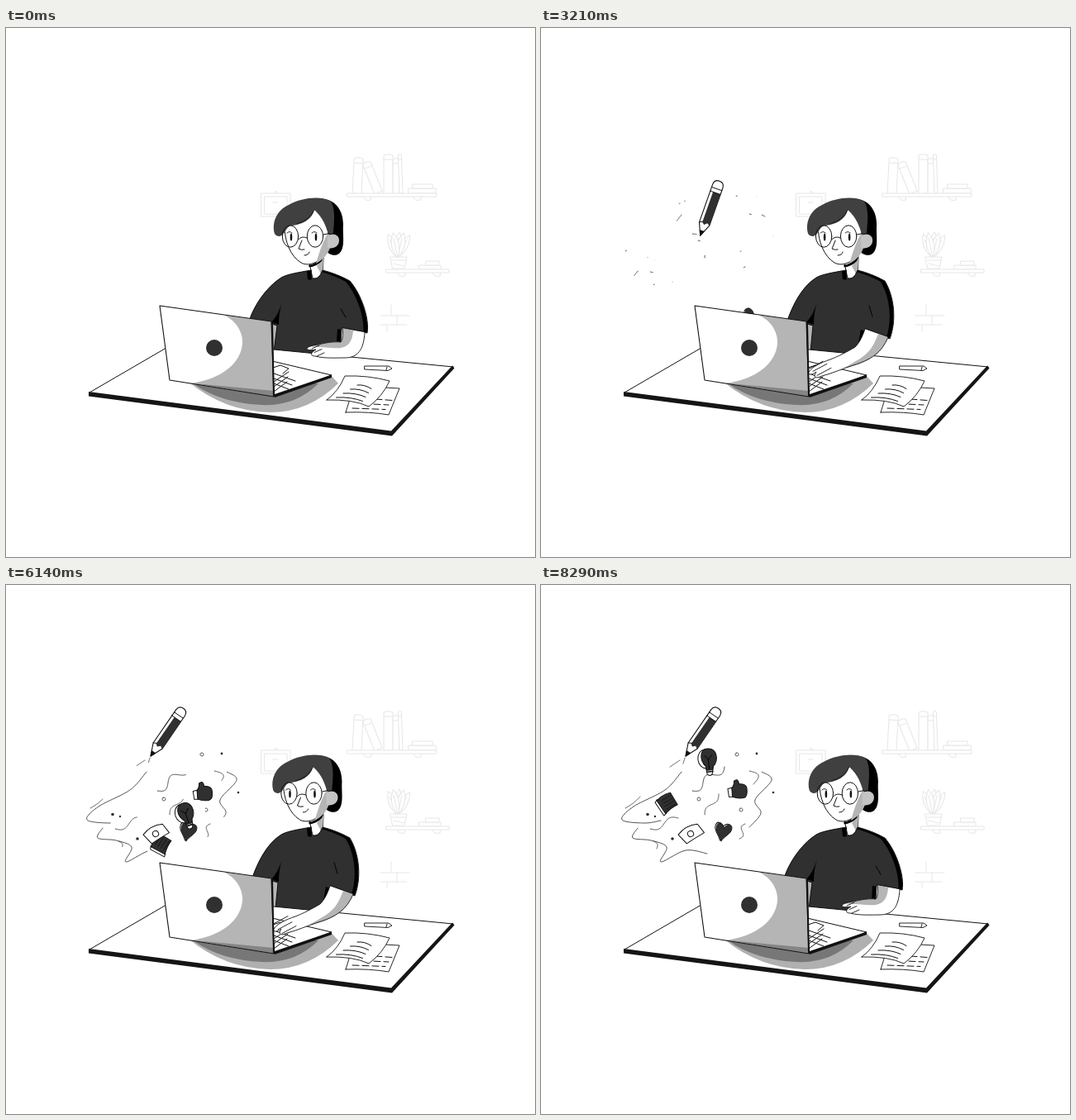
These frames come from a looping animation (640 px wide and 640 px high, 8.43 s). An HTML page with a canvas:

```html
<!DOCTYPE html>
<html lang="en">
<head>
<meta charset="utf-8">
<title>Creative desk</title>
<style>
html, body { margin: 0; width: 100%; height: 100%; overflow: hidden; background: #fff; }
canvas { display: block; width: 640px; height: 640px; }
</style>
</head>
<body>
<canvas id="stage"></canvas>
<script>
const LOOP = 8430, FPS = 14, LAST = 116;
const INK = '#111', DARK = '#303030', HAIR = '#404040', GRAY = '#b5b5b5', WALL = '#e6e6e6';
const canvas = document.getElementById('stage');
const c = canvas.getContext('2d');
const dpr = window.devicePixelRatio || 1;
canvas.width = canvas.height = 640 * dpr;

const clamp = v => Math.max(0, Math.min(1, v));
const span = (t, a, b) => clamp((t - a) / (b - a));
const ease = v => v * v * (3 - 2 * v);
const settle = v => Math.sin(v * Math.PI / 2);
const lerp = (a, b, k) => a + (b - a) * k;

function paint(path, fill, stroke, w = 1) {
  if (fill) { c.fillStyle = fill; c.fill(path); }
  if (stroke) { c.strokeStyle = stroke; c.lineWidth = w; c.stroke(path); }
}
const shape = (d, ...style) => paint(new Path2D(d), ...style);

function oval(x, y, rx, ry, ...style) {
  const p = new Path2D();
  p.ellipse(x, y, rx, ry, 0, 0, 7);
  paint(p, ...style);
}

function placed(x, y, deg, draw) {
  c.save();
  c.translate(x, y);
  c.rotate(deg * Math.PI / 180);
  draw();
  c.restore();
}

// Blends two paths with the same commands.
function mix(a, b, k) {
  const num = /-?[\d.]+/g, to = b.match(num);
  let i = 0;
  return a.replace(num, v => lerp(+v, +to[i++], k).toFixed(3));
}

// --- Wall ---

const box = (x, y, w, h) => shape(`M${x} ${y}h${w}v${h}h${-w}z`, '#fff', WALL);

function shelf(x, y, w) {
  for (const s of [0.18, 0.74]) shape(`M${x + w * s} ${y + 4}q1 6 9 4v-4`, null, WALL);
  box(x, y, w, 4);
}

function upright(x, y, w, h, lean) {
  placed(x, y, lean, () => {
    shape(`M0 0V${-h}Q${w / 2} ${-h - 3} ${w} ${-h}V0ZM0 ${5 - h}H${w}`, '#fff', WALL);
  });
}

function wall() {
  box(309, 200, 35, 28);
  box(313, 204, 27, 21);
  shape('M325 200L327 197L329 200M323 211H329', null, WALL);
  upright(419, 200, 11, 42, 3);
  upright(446, 201, 10, 38, -22);
  upright(457, 200, 11, 46, 0);
  upright(468, 200, 8, 41, 0);
  upright(476, 200, 4, 46, -2);
  box(487, 194, 33, 6);
  box(492, 189, 24, 5);
  shelf(413, 200, 108);
  for (const a of [-24, 26, 2, 12, -12])
    placed(474, 278, a, () => shape('M0 0Q-9 -16 1 -31Q9 -16 0 0V-24', '#fff', WALL));
  shape('M465 277H485L482 291H468ZM467 281H484M469 285L481 288', '#fff', WALL);
  box(500, 287, 26, 5);
  box(508, 282, 16, 5);
  shelf(460, 292, 76);
  shape('M466 335v12M453 348h35M473 348v11M453 359h32M461 360v7', null, WALL);
}

// --- Swirls around the flying things ---

const RIBBONS = [
  [170,226, 150,248, 112,268, 98,284, 125,288, 145,285],
  [117,294, 111,306, 133,309, 152,317, 145,335, 175,321, 201,325],
  [267,226, 279,236, 259,260, 266,276, 252,293]
];
// Start, end, height and number of waves.
const WAVES = [
  [102,270, 120,256, 1, 0.5], [132,295, 166,282, 4, 1], [136,310, 140,319, -3, 0.5],
  [168,212, 156,220, 0, 1], [174,209, 172,216, 0, 1], [252,225, 257,241, -9, 0.5],
  [183,249, 222,220, 5, 1.5], [198,278, 215,253, -3, 1], [247,289, 240,307, 3, 1]
];

function ribbon(p) {
  const n = p.length / 2 - 1;
  const q = (i, k) => p[2 * Math.max(0, Math.min(n, i)) + k];
  return u => [0, 1].map(k => {
    const i = Math.min(n - 1, Math.floor(u * n)), s = u * n - i;
    const a = q(i - 1, k), b = q(i, k), d = q(i + 1, k), e = q(i + 2, k);
    return b + s * (d - a + s * (2 * a - 5 * b + 4 * d - e + s * (3 * (b - d) + e - a))) / 2;
  });
}

function wave([x, y, x2, y2, amp, turns]) {
  const len = Math.hypot(x2 - x, y2 - y);
  return u => {
    const h = amp * Math.sin(u * turns * 2 * Math.PI) / len;
    return [lerp(x, x2, u) - (y2 - y) * h, lerp(y, y2, u) + (x2 - x) * h];
  };
}

const TRAILS = [...RIBBONS.map(ribbon), ...WAVES.map(wave)];
const DOTS = [[129,277.5,1.8], [138,280,1.2], [159,307,1.8], [261,204,1.4], [281,251,1.3]];

function swirls(t) {
  const drawn = span(t, 2900, 6900);
  if (!drawn) return;
  for (const at of TRAILS) {
    const p = new Path2D();
    for (let i = 0; i <= 60; i++) p.lineTo(...at(drawn * i / 60));
    paint(p, null, '#333', 0.85);
  }
  const grow = ease(span(t, 2700, 4300));
  for (const [x, y, r] of DOTS) oval(x, y, r * grow, r * grow, DARK);
  [[191,259], [237,205], [242,272]].forEach(([x, y], i) => {
    const p = new Path2D();
    p.arc(x, y, 2, -2, -2 + 6.283 * span(t, 2900, 4400 + 1800 * i));
    paint(p, null, '#333', 0.85);
  });
}

// --- Things that rise from the screen ---

function pencil() {
  shape('M0 0L-6.5 -15V-64Q-6 -70 0 -70Q6 -70 6.5 -64V-15Z', '#fff', INK, 1.1);
  shape('M-3 -16L0 -14L3 -17L6.5 -15V-55H-3Z', DARK);
  shape('M0 0L-2.5 -6H2.5Z', INK, INK);
  shape('M-6.5 -55H6.5M-6.5 -60H6.5M-6.5 -15L-3 -17', null, INK, 0.9);
}

function heart() {
  const d = 'M0 12C-4 4 -10 2 -9 -5C-8 -11 -2 -10 0 -4C3 -11 10 -11 9.5 -4C9 2 3 5 0 12Z';
  placed(-1.6, -0.5, 0, () => shape(d, '#fff', INK));
  shape(d, DARK, INK, 0.8);
}

function card() {
  shape('M-13.5 -6.5Q0 -12 13 -6L15 7Q2 7 -10 8Z', '#fff', INK);
  oval(0, 0, 3.6, 3.6, null, INK);
}

function thumb() {
  shape('M-11 -1L-6 -2L-5 9L-10 9Z', '#fff', INK);
  shape('M-6 -2Q-3 -5 -3 -10Q2 -14 3 -6Q11 -6 12 -1Q13 10 8 11Q1 12 -6 9Z', DARK, INK);
}

function bulb() {
  oval(-3, -2, 9.5, 11.5, '#fff', INK);
  shape('M-4 9L-3 17Q0 20 3 17L5 8Z', '#fff', INK);
  shape('M0 -14C12 -14 13 1 5 8L4 12H-3L-4 7C-11 -1 -9 -14 0 -14Z', DARK, INK);
  shape('M0 11V-1L-4 -6M0 -1L5 -6', null, '#000', 0.9);
  shape('M-3 14H4', null, INK, 1.7);
}

function book() {
  shape('M-12 -8L-8 -10L-7 10L-11 11Z', '#fff', INK);
  shape('M-9 -9Q0 -12 10 -9L10 8Q1 7 -8 10Z', DARK, INK);
  for (let y = -6; y < 8; y += 4) shape(`M-4 ${y}H8`, null, INK, 0.8);
}

// Each one: time, place [x, y, angle] at the start and at rest.
const FLYERS = [
  { draw: pencil, time: [1880, 4250], from: [253, 402, -32], to: [175, 207, 34.5] },
  { draw: book, time: [5600, 7500], from: [215, 352, -80], to: [152.5, 264, -31] },
  { draw: card, time: [4100, 5350], from: [228, 350, -52], to: [181, 301, -30] },
  { draw: heart, time: [3050, 4750], from: [257, 360, -60], to: [220.5, 298, 12] },
  { draw: thumb, time: [4930, 6350], from: [246, 352, -40], to: [237, 247, -3] },
  { draw: bulb, time: [5250, 7650], from: [236, 358, -35], to: [202.5, 212, -6] }
];

function flyers(t) {
  for (const { draw, time, from, to } of FLYERS) {
    const k = settle(span(t, ...time));
    if (k) placed(...from.map((v, i) => lerp(v, to[i], k)), draw);
  }
}

// --- Person: each pair is the resting and the typing pose ---

const TORSO = [
  'M369 293C352 296 340 298 333 302C314 314 300 337 295 352L322 358L328 360L324 392L404 396L406 363L437 369C440 352 430 322 416 306C405 300 395 296 383 293Q378 306 370 303Z',
  'M369 293C352 296 340 298 333 302C315 313 304 337 298 354L322 358L329 360L326 392L386 396L392 364L422 376C430 355 428 326 416 306C405 300 395 296 383 293Q378 306 370 303Z'
];
const ARM = [
  'M407 363C408 372 407 378 405 380C395 379 386 381 378 383C370 384 364 386 364 388C364 390 370 390 375 389C368 393 368 397 374 397C385 400 400 399 410 399C425 399 433 390 434 368Z',
  'M392 364C388 376 384 382 380 386C370 392 358 398 350 401C338 405 328 410 324 416C322 420 328 420 333 416C328 424 334 424 340 421C352 418 365 412 378 408C405 400 414 388 420 374Z'
];
const SHADE = [
  'M407 363C408 372 407 378 405 380C394 379 380 381 369 386C392 384 418 398 420 366Z',
  'M408 370C402 385 398 392 386 400C378 405 370 409 366 412C405 403 414 388 420 374Z'
];

function torso(k) {
  shape('M316 354H331L327 392H318Z', GRAY, INK, 0.8);
  shape('M367 284L371 303H383L384 278Z', '#fff', INK);
  shape('M376 288L383 301L384 278Z', GRAY);
  shape('M366 287Q377 285 385 275L382 282Q375 289 367 289.5Z', '#000');
  const body = new Path2D(mix(...TORSO, k));
  c.save();
  c.clip(body);
  paint(body, '#000');
  c.translate(-5, 1);
  paint(body, DARK);
  c.restore();
  paint(body, null, INK);
  shape('M334 332C330 344 326 351 321 356L330 359Q330 344 334 332Z', '#000');
  shape(mix('M405 340L411 350', 'M397 336L401 349', k), null, '#000');
}

function arm(k, t) {
  const d = mix(...ARM, k);
  shape(d, '#fff');
  shape(mix(...SHADE, k), GRAY);
  shape(d, null, INK, 0.9);
  for (let i = 0; i < 3; i++) {
    const tap = k * Math.sin(t / 62 + i * 2.1) * 1.3;
    const x = lerp(370 + i * 3, 324 + i * 5, k), y = lerp(388 + i * 4.5, 411 + i * 5, k) + tap;
    shape(`M${x} ${y}l${lerp(9, 17, k)} ${lerp(-4, -9, k)}`, null, INK, 0.9);
  }
}

function head(t) {
  const open = Math.min(...[2000, 5500].map(b => clamp((Math.abs(t - b) - 60) / 110)));
  c.save();
  c.translate(-2 * Math.sin(Math.PI * t / LOOP), 0);
  shape('M385 207C400 209 408 222 408 238C407 250 411 266 403 273C397 277 390 274 386 268L388 225Z', '#000');
  shape('M337 240C337 258 344 276 357 284C366 289 380 284 388 270L392 225L366 215L340 232Z', '#fff', INK);
  shape('M391 246C384 256 380 268 375 285C384 280 389 274 392 266Z', GRAY);
  shape('M389 252C395 247 403 250 403 257C403 264 396 268 389 266Z', '#c4c4c4');
  shape('M325 249C321 235 328 220 342 214C358 205 380 203 392 209C399 216 397 235 396 248L390 250C387 240 384 230 373 220C370 232 358 238 345 239C338 241 338 250 331 252Q327 252 325 249Z', HAIR);
  shape('M373 220Q368 232 352 237', null, INK, 0.8);
  for (const x of [344, 374]) {
    oval(x, 252, 9.7, 13.2, null, INK);
    shape(`M${x - 4} 248q3 -3 6 0`, null, INK, 0.9);
    if (open) oval(x + 1, 253, 1.3, 4.5 * open, INK);
  }
  shape('M353.5 256Q358 251 364 254M384 250L391 248.5', null, INK);
  shape('M358 257L354 267Q357 269 361 268M361 275Q366 275 367 271', null, INK);
  c.restore();
}

// --- Desk and laptop ---

function desk() {
  shape('M101 441L210 378L541 410L466 488Z', '#fff');
  shape('M193 387.5L101 441M324 389L541 410', null, INK);
  shape('M100 440L466 487.5L540 408.5L542.5 411.5L467 493.5L100 445.5Z', '#151515');
  shape('M411 465L421 433L476 436L463 468Q440 464 411 465Z', '#fff', INK, 0.9);
  c.setLineDash([8, 4]);
  for (let i = 0; i < 3; i++) shape(`M${447 - 14 * i} ${449 + 5.5 * i}l${20 + 10 * i} 1.5`, null, INK);
  c.setLineDash([]);
  shape('M388 450Q402 440 410 421Q438 420 464 427Q456 445 439 458Q420 449 388 450Z', '#fff', INK, 0.9);
  for (let i = 0; i < 4; i++)
    shape(`M${425 - 8.5 * i} ${432 + 5 * i}q${9 + 3 * i} -1 ${17 + 5 * i} 4.5`, null, INK);
  shape('M434 409H463L467 412L462 414.5L434 413ZM461 410L460 414', '#fff', INK, 0.9);
  shape('M222 429Q265 464 320 465Q366 465 402 430L393 420Z', '#b0b0b0');
  shape('M226 430Q260 454 310 456Q350 458 378 430Z', '#777');
  shape('M322 403L394 420L325 445Z', '#fff', INK);
  shape('M325 443L394 419.5V423L325 447Z', '#111');
  for (let i = 0; i < 3; i++) {
    const y = 418 + 6 * i;
    shape(`M324 ${y}l${26 - 4 * i} ${9 - i}M324 ${y + 10}l${18 - i} -12`, null, INK);
  }
  shape('M323 411L332 408L342 412L335 418', null, INK);
}

function screen() {
  const lid = 'M186 336L321 355L324 446L198 426Z';
  shape(lid, '#fff');
  shape('M264 347.5C280 355 287 370 286 382C284 405 262 425 222 430L324 446L321 355Z', GRAY);
  shape('M228 430L324 439V446Z', '#858585');
  shape(lid, null, INK, 1.1);
  shape('M321 355L323 356L325 446H323Z', '#111');
  oval(252, 387, 10, 10, DARK);
}

function render(t) {
  c.setTransform(dpr, 0, 0, dpr, 0, 0);
  c.fillStyle = '#fff';
  c.fillRect(0, 0, 640, 640);
  c.lineJoin = c.lineCap = 'round';
  const typing = ease(span(t, 250, 2150)) - ease(span(t, 7300, 8250));
  wall();
  torso(typing);
  head(t);
  desk();
  arm(typing, t);
  swirls(t);
  flyers(t);
  screen();
}

const start = performance.now();
function tick() {
  const now = (performance.now() - start) % LOOP;
  render(Math.min(LAST, Math.floor(now * FPS / 1000 + 0.07)) * 1000 / FPS);
  requestAnimationFrame(tick);
}
tick();
</script>
</body>
</html>
```
